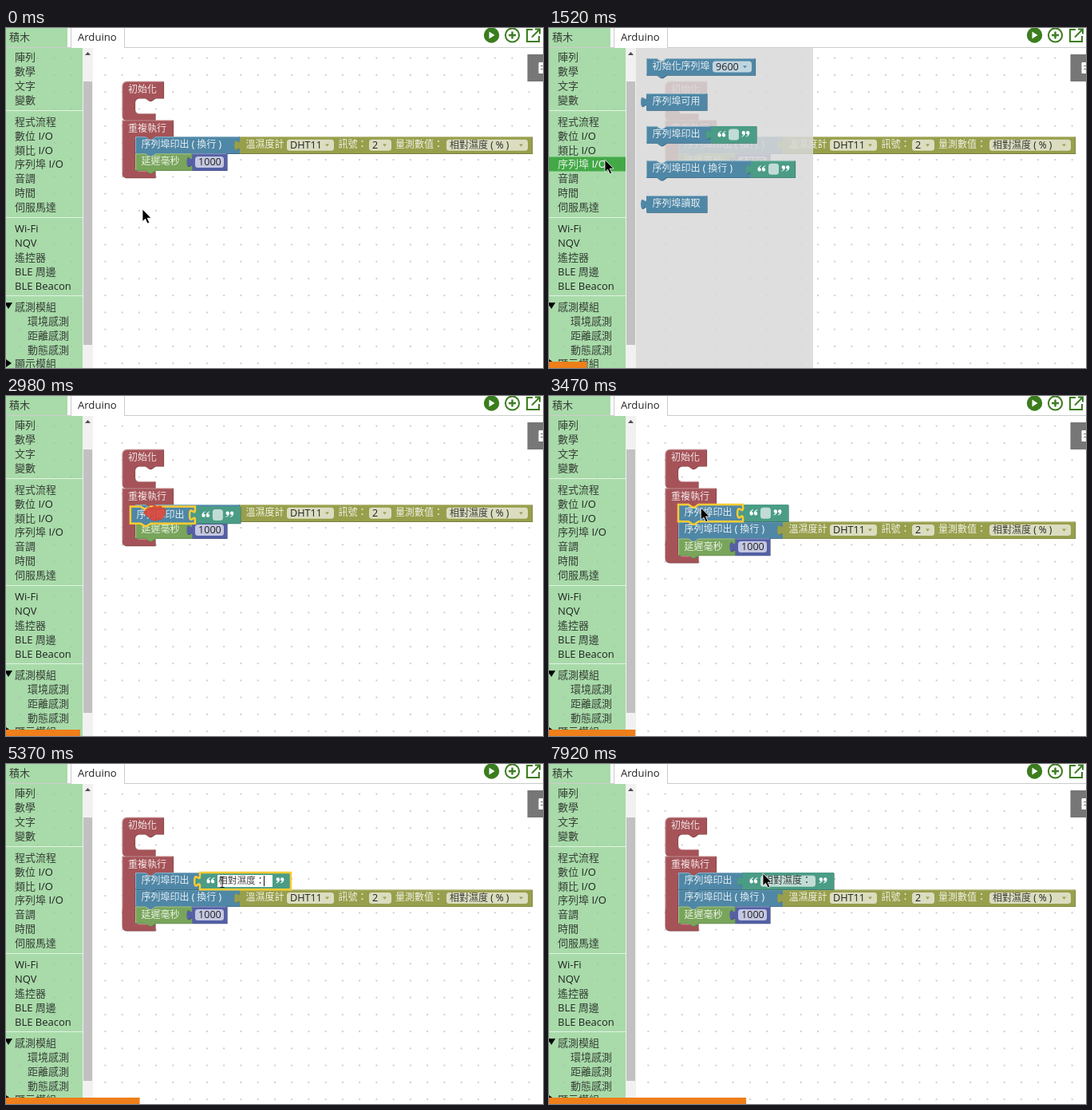
An HTML page for the animation above (7.99 s loop, 673 px wide and 426 px high).

```html
<!DOCTYPE html>
<html lang="zh-Hant">
<head>
<meta charset="utf-8">
<title>積木</title>
<style>
  html, body { margin: 0; width: 100%; height: 100%; overflow: hidden; background: #fff; }
  svg { display: block; width: 673px; height: 426px; }
  text { font-family: "Open Sans", "Noto Sans CJK TC", "Noto Sans CJK JP", "Noto Sans CJK", sans-serif; white-space: pre; }
  .han { font-weight: 300; fill-opacity: .85; }
</style>
</head>
<body>
<svg id="stage" viewBox="0 0 673 426"></svg>
<script>
const LOOP = 7990, ROW = 21.2, FIRST = 136.1;
const OPEN = 1500, PRESS = 2300, DRAG = 2450, DROP = 3230, EDIT = 4500, PASTE = 4950, LEAVE = 7200;
const RED = '#a55358', BLUE = '#4f87a6', GREEN = '#78a55b', OLIVE = '#989f4c', TEAL = '#4b9c86', INDIGO = '#5560a6';

// Chinese runs are set lighter than Latin ones
const text = (x, y, s, size = 12, fill = '#fff', extra = '') =>
  `<text x="${x}" y="${y}" font-size="${size}" fill="${fill}" ${extra}>` +
  s.replace(/[\u4e00-\u9fff]+/g, '<tspan class="han">$&</tspan>') + '</text>';
const rect = (x, y, w, h, fill, extra = '') =>
  `<rect x="${x}" y="${y}" width="${w}" height="${h}" fill="${fill}" ${extra}/>`;
const group = (x, y, body, id = '') =>
  `<g ${id && `id="${id}"`} transform="translate(${x} ${y})">${body}</g>`;
const line = d => `<path d="${d}" fill="none" stroke="#fff" stroke-opacity=".35"/>`;

// Block outlines
const TAB = 'v4.3c0 8.5-6.8-6.8-6.8 6.4s6.8-2.1 6.8 6.4';
const NOTCH = 'l5 3.4h2.6l5-3.4', NOTCH_BACK = 'l-5 3.4h-2.6l-5-3.4';
const stackPath = (w, socket) =>
  `M0 0H12.8${NOTCH}H${w}${socket ? TAB : ''}V${ROW}H25.5${NOTCH_BACK}H0z`;
const valuePath = w => `M0 0${TAB}V${ROW}H${w}V0z`;
const loopPath = (w, top, slot, r) =>
  `M0 ${r}a${r} ${r} 0 0 1 ${r}-${r}H${w}v${top}H41.5${NOTCH_BACK}H21a5 5 0 0 0-5 5v${slot - 10}` +
  `a5 5 0 0 0 5 5H41.5v8.5H5a5 5 0 0 1-5-5z`;

const shape = (d, fill, id = '') =>
  `<path ${id && `class="${id}"`} d="${d}" fill="${fill}" transform="translate(.6 .6)" style="filter:brightness(.72)"/>` +
  `<path ${id && `class="${id}"`} d="${d}" fill="${fill}"/>`;
const outline = (d, id) => `<path id="${id}" d="${d}" fill="none" stroke="#fc3" stroke-width="2.5"/>`;
const stack = (w, label, socket) =>
  shape(stackPath(w, socket), BLUE) + line(`M.5 ${ROW - 1}V.5H12.8${NOTCH}H${w - 1}`) + text(7.5, 14.2, label);
const value = (w, fill, body = '') => shape(valuePath(w), fill) + line(`M0 .5H${w - 1}`) + body;
const box = (x, w, id = '') =>
  rect(x, 3.6, w, 14, '#fff', `rx="3.5" fill-opacity=".65" ${id && `id="${id}"`}`);
const field = (x, w, label, color, size = 12.6) =>
  box(x, w) + text(x + 4, 14.8, label, size, '#222') +
  (color ? `<path d="M${x + w - 11} 9.3h5l-2.5 3z" fill="${color}"/>` : '');

const mark = 'M4.5 0C1 1 0 3 0 5.2a2.2 2.2 0 1 0 2.2-2.2C2.3 2 3.2 1.3 4.5.8z';
const quotes = `<path d="${mark}" fill="#fff"/><path d="${mark}" fill="#fff" transform="translate(5.4 0)"/>`;
const closing = (x, id = '') => group(x, 0, `<g transform="translate(10.4 13.5) rotate(180)">${quotes}</g>`, id);
const emptyText = value(55.5, TEAL, group(8.5, 6, quotes) + box(22, 13) + closing(38));

// Sidebar
const rows = [
  [36, '陣列'], [54, '數學'], [72, '文字'], [90, '變數'],
  [117, '程式流程'], [135, '數位 I/O'], [153, '類比 I/O'], [170.5, '序列埠 I/O'], [188, '音調'], [206, '時間'], [224, '伺服馬達'],
  [251, 'Wi-Fi'], [269, 'NQV'], [287, '遙控器'], [305, 'BLE 周邊'], [323, 'BLE Beacon'],
  [349, '感測模組'], [367, '環境感測', 27], [385, '距離感測', 27], [403, '動態感測', 27], [420.5, '顯示模組']
];
const SERIAL = 7;
const sidebar =
  rect(0, 25, 96, 401, '#a8dba9') + rect(0, 25, 96, 401, 'url(#dots)', 'opacity=".7"') +
  [103, 237, 335].map(y => rect(0, y, 96, 1, '#e3f3e3')).join('') +
  rect(0, 0, 96, 18, '#e2e4e2', 'id="hover"') +
  rows.map(([y, s, x = 11], i) => text(x, y + 4.6, s, 13, '#222', `id="row${i}"`)).join('') +
  '<path d="M-2 344h10l-5 8zM0 415l7 5-7 5z"/>' +
  rect(96, 25, 13, 401, '#f1f1f1') + rect(97, 67, 11, 330, '#c1c1c1') +
  '<path d="M99 34l3.5-4 3.5 4z" fill="#505050"/>';

const header =
  rect(0, 0, 673, 25, '#fff') + rect(0, 0, 77, 24, '#a8dba9') + rect(0, 24, 673, 1, '#ccc') +
  rect(81, 0, 1, 24, '#ccc') + rect(148, 0, 1, 24, '#ccc') + rect(82, 24, 66, 1, '#fff') +
  text(4, 16, '積木', 13, '#222') + text(90, 16, 'Arduino', 13.1, '#222') +
  `<circle cx="608.5" cy="9" r="9.7" fill="#3a7d1e"/><path d="M605.5 4.5v9l7-4.5z" fill="#fff"/>
   <g fill="none" stroke="#3a7d1e" stroke-width="2"><circle cx="634.5" cy="9" r="8.6"/>
   <path d="M634.5 4.5v9M630 9h9" stroke-width="2.4"/>
   <path d="M660 2h-7v15h15v-7M663 1.5h6v6M669 1.5l-10 10"/></g>` +
  rect(653.5, 33, 20, 34, '#777') + rect(667.5, 43, 6, 14, '#fff', 'rx="1"') +
  rect(670, 47, 4, 1, '#777') + rect(670, 51, 4, 1, '#777');

const sensor = value(366.5, OLIVE,
  text(7.5, 14.2, '溫濕度計') + field(59, 59, 'DHT11', OLIVE) + text(123.5, 14.2, '訊號：') +
  field(162, 28, '2', OLIVE) + text(195, 14.2, '量測數值：') + field(259, 102, '相對濕度 ( % )', OLIVE, 12));
const delay = shape(stackPath(71.5, true), GREEN) + line(`M.5 20V.5H12.8${NOTCH}H70`) + text(7.5, 14.2, '延遲毫秒') +
  group(71.5, 0, value(43.5, INDIGO, field(3.5, 36, '1000')));

const workspace =
  rect(109, 25, 564, 401, 'url(#dots)') +
  group(145.5, 66.8, shape(loopPath(52, ROW, 19, 6), RED) +
    line('M.5 47V6a6 6 0 0 1 6-5.5H51M17 38a5 5 0 0 0 4 2.700H41') + text(7.5, 14, '初始化')) +
  group(145.5, 115.4, shape(loopPath(64, 20.7, 43, 0.1), RED, 'loop') + line('M.5 66V.5H63') + text(7.5, 14.2, '重複執行')) +
  group(162, FIRST, line('M.5 40a5 5 0 0 0 4 3.5H25') + stack(131, '序列埠印出 ( 換行 )', true) +
    group(131, 0, sensor) + group(0, ROW, delay), 'rest');

const flyout = rect(109, 25, 222, 401, '#d9d9d9', 'fill-opacity=".86"') +
  group(122, 38, stack(136.5, '初始化序列埠') + field(83, 49, '9600', BLUE)) +
  [[82, '序列埠可用'], [210, '序列埠讀取']].map(([y, s]) =>
    group(122, y, value(76, BLUE, text(7.5, 14.2, s)))).join('') +
  group(122, 166.2, stack(131, '序列埠印出 ( 換行 )', true) + group(131, 0, emptyText));

const print = stack(81, '序列埠印出', true) +
  group(81, 0, shape(valuePath(57), TEAL, 'literal') + group(8.5, 6, quotes) + box(22, 13, 'slot') +
    text(26, 14.4, '相對濕度：', 12, '#222', 'id="typed"') + closing(38, 'closing') +
    `<g id="editor">${rect(22, 3, 13, 15, '#fff', 'id="paper"')}${text(23, 14.4, '相對濕度：', 11.7, '#222', 'id="draft"')}` +
    rect(28, 4, 1, 13, '#111', 'id="caret"') + '</g>' + outline(valuePath(114), 'textSel')) +
  outline(stackPath(81, true), 'printSel');

const pointers =
  `<g id="pointer"><path id="arrow" d="M0 0V15.5L3.6 12.2 6.2 18 8.8 16.8 6.2 11.2H11z" fill="#000" stroke="#fff" stroke-width=".8"/>
   <path id="beam" d="M-2.5-6.5H2.5M0-6.5V6.5M-2.5 6.5H2.5" fill="none" stroke="#111"/>
   <path id="grab" d="M-15 2Q-10-7-4-5Q-1-10 3-6Q7-9 9-5Q14-4 13 2Q12 10 5 11Q-2 14-7 9Z" fill="#e2402f" fill-opacity=".85"/></g>`;

stage.innerHTML =
  `<defs><pattern id="dots" x="135" y="27" width="21.25" height="21.25" patternUnits="userSpaceOnUse">
   ${rect(9.9, 9.9, 1.5, 1.5, '#aaa')}</pattern></defs>` +
  workspace + sidebar + group(0, 0, flyout, 'flyout') + group(122, 123, print, 'print') + header +
  rect(0, 418, 0, 8, '#ee7f1a', 'id="bar"') + pointers;

const $ = id => document.getElementById(id);
const show = (id, on) => $(id).setAttribute('display', on ? 'inline' : 'none');
const place = (id, x, y) => $(id).setAttribute('transform', `translate(${x} ${y})`);
const set = (id, name, v) => $(id).setAttribute(name, v);
const setPaths = (cls, d) => document.querySelectorAll('.' + cls).forEach(p => p.setAttribute('d', d));

// Pointer route: time, x, y
const route = [
  [70, 171, 227], [780, 84, 185], [1150, 70, 165], [1650, 70, 165], [2250, 153, 129], [DRAG, 153, 129],
  [2900, 186, 144], [3000, 187, 144.5], [DROP, 190, 143], [3450, 190, 140], [3850, 226, 117], [4200, 267, 141],
  [4400, 271, 148], [6050, 271, 148], [6400, 295, 134], [6600, 295, 134], [7050, 304, 116], [7300, 304, 116],
  [7620, 303, 130], [7900, 268, 137]
];
function pointerAt(t) {
  const i = route.findIndex(p => p[0] > t);
  if (i === 0) return route[0].slice(1);
  if (i < 0) return route[route.length - 1].slice(1);
  const [t0, x0, y0] = route[i - 1], [t1, x1, y1] = route[i];
  const u = (t - t0) / (t1 - t0), k = u * u * (3 - 2 * u);
  return [x0 + (x1 - x0) * k, y0 + (y1 - y0) * k];
}

function draw(t) {
  const [x, y] = pointerAt(t);
  const open = t >= OPEN && t < DRAG, dropped = t >= DROP, pasted = t >= PASTE;
  const editing = t >= EDIT && t < LEAVE;

  const over = t < OPEN && x < 96 ? rows.findIndex(r => Math.abs(r[0] - y) <= 9) : -1;
  const lit = open ? SERIAL : over;
  show('hover', lit >= 0);
  if (lit >= 0) set('hover', 'y', rows[lit][0] - 9);
  set('hover', 'fill', open ? '#43a947' : '#e2e4e2');
  set('row' + SERIAL, 'fill', open ? '#fff' : '#222');

  show('flyout', open);
  show('print', t >= OPEN);
  if (dropped) place('print', 162, FIRST);
  else if (t >= DRAG) place('print', x - 31, y - 6);
  else place('print', 122, 123);
  place('rest', 162, FIRST + (dropped ? ROW : 0));
  setPaths('loop', loopPath(64, 20.7, dropped ? 43 + ROW : 43, 0.1));

  setPaths('literal', valuePath(pasted ? 114 : 57));
  set('textSel', 'd', valuePath(pasted ? 114 : 57));
  set('slot', 'width', pasted ? 69 : 13);
  set('paper', 'width', pasted ? 69 : 13);
  place('closing', pasted ? 95 : 38, 0);
  set('caret', 'x', pasted ? 80 : 24);
  show('typed', pasted && !editing);
  show('draft', pasted);
  show('editor', editing);
  show('caret', Math.floor((t - (pasted ? PASTE : EDIT)) / 530) % 2 === 0);
  show('printSel', t >= PRESS && t < EDIT);
  show('textSel', editing);

  const grabbing = t >= DRAG && t < DROP, beam = t >= 4330 && t < 6200;
  place('pointer', x, y);
  show('grab', grabbing);
  show('beam', beam);
  show('arrow', !grabbing && !beam);
  set('bar', 'width', t < 70 ? 0 : t * 0.0312);
}

const start = performance.now();
function tick() {
  draw((performance.now() - start) % LOOP);
  requestAnimationFrame(tick);
}
tick();
</script>
</body>
</html>
```
